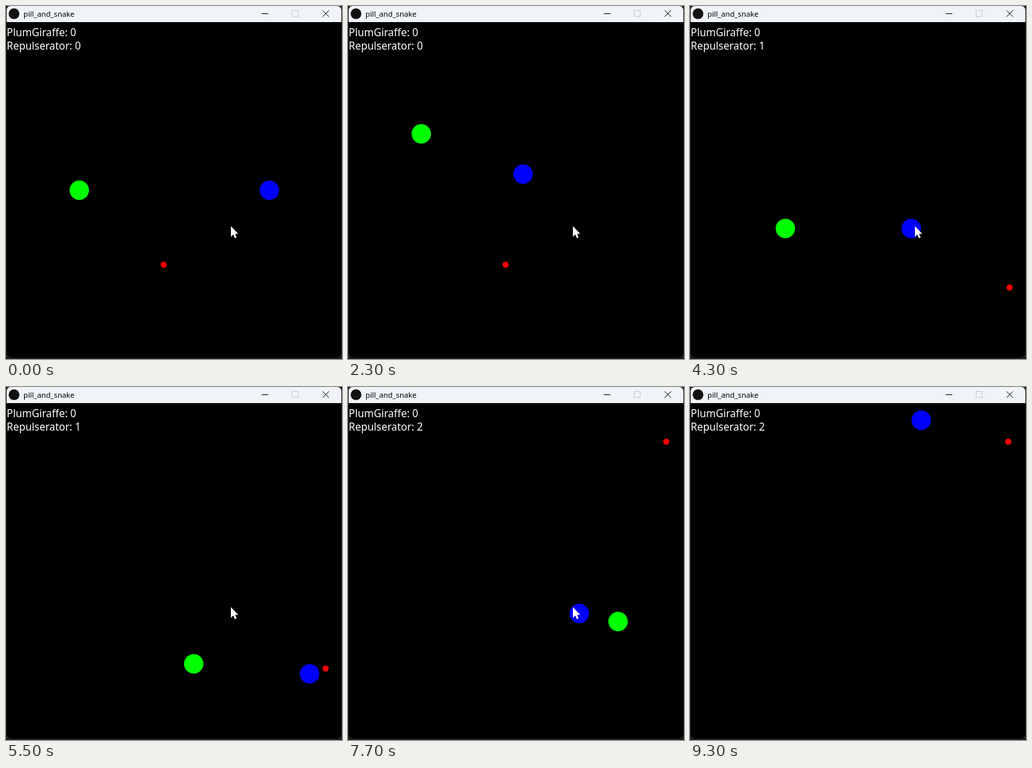
These frames come from a looping animation (502 by 526 pixels, 9400 ms). An HTML page with a canvas:

```html
<!DOCTYPE html>
<html>
<head>
<meta charset="utf-8">
<style>
html, body { margin: 0; width: 100%; height: 100%; overflow: hidden; background: #000; }
canvas { display: block; }
</style>
</head>
<body>
<canvas id="stage" width="502" height="526"></canvas>
<script>
const ctx = document.getElementById('stage').getContext('2d');
const LOOP = 9400, TICK = 100, SPEED = 3, RADIUS = 14.5;
const CURSOR_LEAVES = 85;
const FONT = '"Noto Sans", "Open Sans", sans-serif';
const HEADINGS = { U: [0, -1], D: [0, 1], L: [-1, 0], R: [1, 0] };

// Each leg is a heading and its length in moves.
const green = {
  x: 109.5, y: 274.5, color: '#0f0',
  legs: 'U57 R26 D29 L46 D58 R7 U11 R70 D37 R13 U31 R12 D25 R16 U25 R40'.split(' ')
};
const blue = {
  x: 393.5, y: 274.5, color: '#00f',
  legs: 'D32 L25 U51 L19 D60 L13 U22 R77 D36 L8 U6 R29 U28 L57 U96'.split(' ')
};
const pills = [
  { from: 0, x: 235.5, y: 385.5 },
  { from: 33, x: 477.5, y: 419.5 },
  { from: 61, x: 475.5, y: 81.5 }
];

function positionAfter(player, moves) {
  let { x, y } = player;
  for (const leg of player.legs) {
    const [dx, dy] = HEADINGS[leg[0]];
    const count = Math.min(moves, +leg.slice(1));
    x += dx * count * SPEED;
    y += dy * count * SPEED;
    moves -= count;
  }
  return [x, y];
}

function disc(x, y, r, color) {
  ctx.fillStyle = color;
  ctx.beginPath();
  ctx.arc(x, y, r, 0, 2 * Math.PI);
  ctx.fill();
}

function text(string, x, y, size, color) {
  ctx.font = `${size}px ${FONT}`;
  ctx.fillStyle = color;
  ctx.fillText(string, x, y);
}

function stroke(path, color) {
  ctx.strokeStyle = color;
  ctx.lineWidth = 1;
  ctx.stroke(new Path2D(path));
}

function drawTitleBar() {
  ctx.fillStyle = '#f0f4f9';
  ctx.fillRect(0, 0, 502, 24);
  disc(12, 11.5, 8, '#111');
  text('pill_and_snake', 26, 16, 11.2, '#000');
  stroke('M382 11.5h10', '#000');
  stroke('M427.5 6.5h9v9h-9z', '#c8ccd0');
  stroke('M473 6.5l9.5 9.5m0 -9.5l-9.5 9.5', '#000');
}

function drawCursor() {
  ctx.fillStyle = '#fff';
  ctx.fill(new Path2D('M336 328v16l3.6-3.4 2.4 5.4 2.6-1.1-2.3-5.3h4.7z'));
}

function draw(tick) {
  const moves = Math.max(0, Math.round(6.03 * tick - 1));
  const score = pills.filter(p => tick >= p.from).length - 1;

  ctx.fillStyle = '#1e1e1e';
  ctx.fillRect(0, 0, 502, 526);
  ctx.save();
  ctx.beginPath();
  ctx.roundRect(1, 0, 500, 524, [6, 6, 8, 8]);
  ctx.clip();
  ctx.fillStyle = '#000';
  ctx.fillRect(0, 0, 502, 526);

  disc(pills[score].x, pills[score].y, 4.6, '#f00');
  for (const player of [green, blue])
    disc(...positionAfter(player, moves), RADIUS, player.color);
  text('PlumGiraffe: 0', 1, 44.5, 15.5, '#fff');
  text('Repulserator: ' + score, 1, 64.5, 15.5, '#fff');
  drawTitleBar();
  ctx.restore();
  if (tick < CURSOR_LEAVES) drawCursor();
}

function animate() {
  draw(Math.floor(performance.now() % LOOP / TICK));
  requestAnimationFrame(animate);
}
animate();
</script>
</body>
</html>
```
